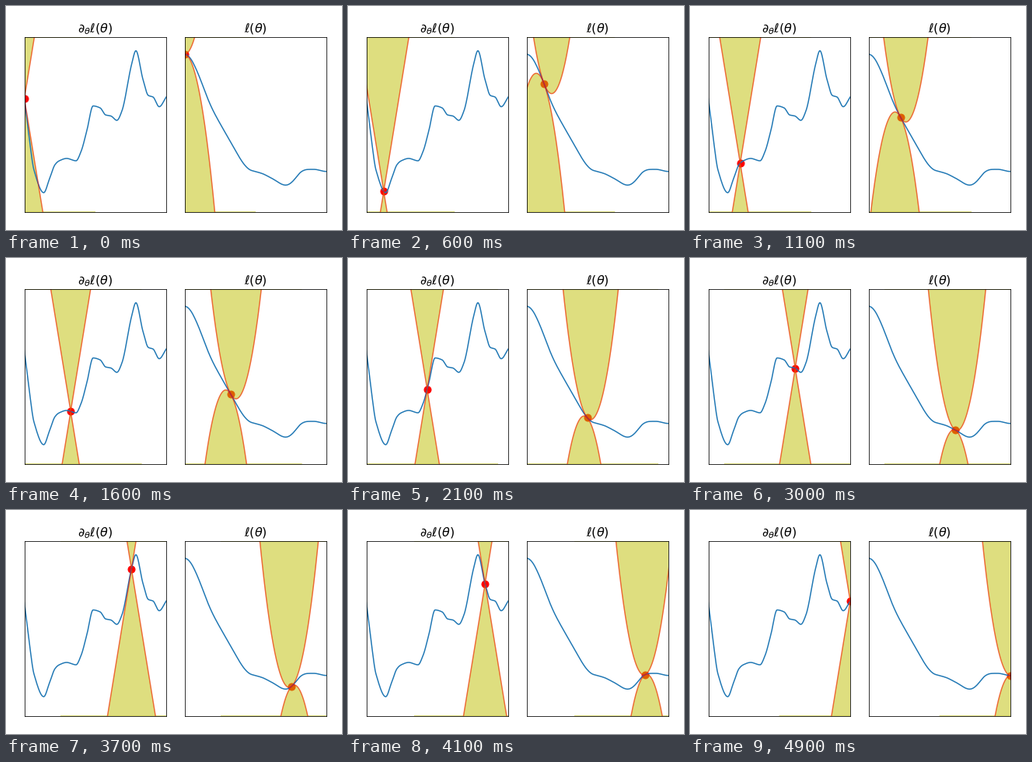
A matplotlib script for the animation above (5 s loop, 432 by 288 pixels).

```python
import numpy as np
import matplotlib.pyplot as plt
from matplotlib.animation import FuncAnimation

# All coordinates are stage pixels, y pointing down.
WIDTH, HEIGHT, DPI = 432, 288, 72
TOP, BOTTOM = 40, 264.6
LEFT_X, RIGHT_X, SPAN = 23.6, 229.6, 182.4
FRAMES = 50
STEEPNESS = 6.13      # Lipschitz bound of the gradient
SCALE = 0.0217        # gradient height to slope of the loss
ZERO_LEVEL = 116.7    # height at which the gradient vanishes
LOSS_START = 62

# Turning points and bends of the gradient.
KEYS = [(23.6, 119), (30, 171), (36, 211), (48.5, 240), (56, 222), (63, 204),
        (68.5, 199), (78, 196), (90, 199), (96.5, 187), (104, 160),
        (112, 128.5), (121, 131), (128, 140), (135, 141.5), (142.5, 147),
        (149, 135), (161.5, 75), (167, 57.5), (176, 94), (183, 115),
        (189, 117), (197, 129.5), (206, 117)]


def monotone_curve(x, keys):
    """Cubic Hermite curve that turns only at the keys."""
    kx, ky = np.array(keys, float).T
    h, rise = np.diff(kx), np.diff(ky)
    secant = rise / h
    a, b = secant[:-1], secant[1:]
    inner = np.where(a * b > 0, 2 * a * b / (a + b), 0)
    m = np.r_[secant[0], inner, secant[-1]]
    i = np.clip(np.searchsorted(kx, x) - 1, 0, len(h) - 1)
    t = (x - kx[i]) / h[i]
    return (ky[i] + rise[i] * t * t * (3 - 2 * t)
            + h[i] * t * (1 - t) * (m[i] * (1 - t) - m[i + 1] * t))


offsets = np.linspace(0, SPAN, 730)
gradient = monotone_curve(LEFT_X + offsets, KEYS)
slope = SCALE * (gradient - ZERO_LEVEL)
steps = (slope[1:] + slope[:-1]) / 2 * np.diff(offsets)
loss = LOSS_START + np.r_[0, np.cumsum(steps)]

reach = np.linspace(-SPAN / 2, SPAN / 2, 365)
cone = STEEPNESS * np.abs(reach)
parabola = SCALE * STEEPNESS * reach ** 2

fig = plt.figure(figsize=(WIDTH / DPI, HEIGHT / DPI), dpi=DPI, facecolor="white")


class Panel:
    def __init__(self, left, title, curve):
        self.left, self.curve = left, curve
        ax = fig.add_axes([left / WIDTH, 1 - BOTTOM / HEIGHT,
                           SPAN / WIDTH, (BOTTOM - TOP) / HEIGHT])
        ax.set(xlim=(left, left + SPAN), ylim=(BOTTOM, TOP), xticks=[], yticks=[])
        ax.set_title(title, fontsize=16)
        ax.plot(left + offsets, curve, color="C0", lw=1.5, zorder=2)
        self.marker, = ax.plot([], [], "o", color="red", ms=9, zorder=1)
        self.fills = [ax.fill([left], [TOP], color="y", alpha=0.5, lw=1,
                              zorder=1.2)[0] for _ in range(2)]
        self.bounds = [ax.plot([], [], color="red", alpha=0.5, lw=1.5,
                               zorder=2.1)[0] for _ in range(2)]
        self.floor, = ax.plot([], [], color="y", alpha=0.5, lw=1, zorder=1.3,
                              solid_capstyle="butt")

    def update(self, shift, tilt, spread):
        x = self.left + shift
        y = np.interp(shift, offsets, self.curve)
        xs = x + reach
        upper = y + tilt * reach - spread
        lower = y + tilt * reach + spread
        self.marker.set_data([x], [y])
        for fill, line, bound, edge in zip(self.fills, self.bounds,
                                           (upper, lower), (TOP, BOTTOM)):
            ys = np.clip(bound, TOP, BOTTOM)
            fill.set_xy(np.column_stack([np.r_[xs, xs[-1], xs[0]],
                                         np.r_[ys, edge, edge]]))
            line.set_data(xs, bound)
        # The band collapses to a thin line where the bound leaves the view.
        self.floor.set_data(xs, np.where(lower > BOTTOM, BOTTOM - 0.1, np.nan))


gradient_panel = Panel(LEFT_X, r"$\partial_\theta\ell(\theta)$", gradient)
loss_panel = Panel(RIGHT_X, r"$\ell(\theta)$", loss)


def draw(frame):
    shift = SPAN * frame / (FRAMES - 1)
    gradient_panel.update(shift, 0, cone)
    loss_panel.update(shift, np.interp(shift, offsets, slope), parabola)


animation = FuncAnimation(fig, draw, frames=FRAMES, interval=100,
                          init_func=lambda: draw(0), repeat=True,
                          repeat_delay=0, blit=False)
plt.show()
```
